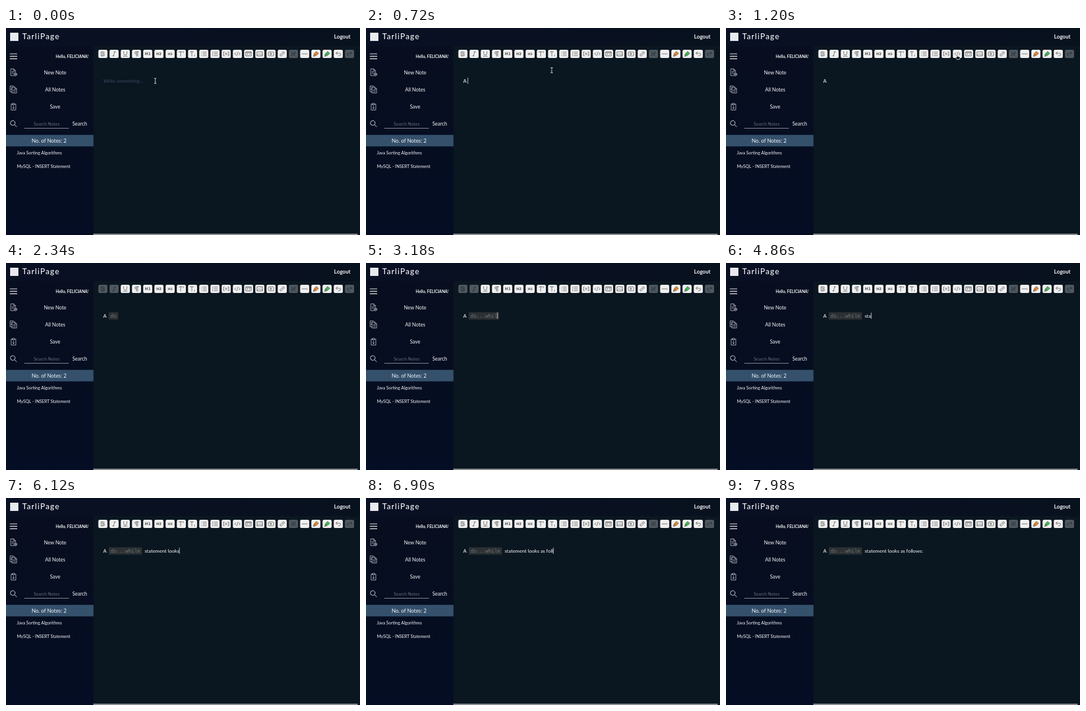
An HTML page that plays this animation: 600 px wide and 352 px high, repeating every 8 s.

```html
<!DOCTYPE html>
<html lang="en">
<head>
<meta charset="utf-8">
<title>Note editor</title>
<style>
  html, body { margin: 0; width: 100%; height: 100%; overflow: hidden; background: #0a1620; }
  svg { display: block; width: 600px; height: 352px; }
  text { font-family: Lato, "Open Sans", sans-serif; fill: #f6f7f9; white-space: pre; }
  .mid { text-anchor: middle; }
  .menu { font-size: 8.5px; }
  .note { font-size: 7.4px; }
  .body { font-size: 8.4px; fill: #fff; }
  .code { font-family: "Liberation Mono", monospace; font-size: 8.4px; fill: #74777a; }
  .line { fill: none; stroke: #d4d7dd; stroke-width: .75; stroke-linecap: round; stroke-linejoin: round; }
  .tool path { fill: none; stroke: #5c5c5c; stroke-width: .85; stroke-linecap: round; stroke-linejoin: round; }
  .tool text { font-family: "DejaVu Sans", sans-serif; fill: #555; text-anchor: middle; }
</style>
</head>
<body>
<svg viewBox="0 0 600 352">
  <defs>
    <linearGradient id="head"><stop stop-color="#0a1024"/><stop offset="1" stop-color="#08111e"/></linearGradient>
    <linearGradient id="side" x2="0" y2="1"><stop stop-color="#080e1f"/><stop offset="1" stop-color="#040d23"/></linearGradient>
  </defs>
  <rect width="600" height="352" fill="#0a1620"/>
  <rect y="31" width="148.300" height="321" fill="url(#side)"/>
  <rect width="600" height="31" fill="url(#head)"/>
  <rect x="148" y="349.700" width="448" height="2.300" fill="#8b8d8f"/>

  <rect x="7" y="8" width="14" height="14" fill="#e8eaed"/>
  <text x="27.500" y="19.400" font-size="13.400" font-weight="500" letter-spacing="1.200">TarliPage</text>
  <text x="570" y="18.200" class="mid" font-size="9" font-weight="700">Logout</text>
  <text x="140" y="51" text-anchor="end" font-size="6.800" font-weight="700">Hello, FELICIANA!</text>

  <g class="line">
    <path d="M7 44H18.500M7 48.200H18.500M7 52.400H18.500" stroke="#f3f4f6" stroke-width="1.200"/>
    <path d="M13.500 81H8V69.500H13L16 72.500V75M13 69.500V72.500H16M10 74.500H14M10 77H12.500"/>
    <circle cx="16" cy="78.800" r="2.500"/><path d="M16 77.500V80.100M14.700 78.800H17.300"/>
    <path d="M10 108.500H7V98.500H12.500L13.500 99.500M8.500 102H10M8.500 104.500H10M10.500 100.500H15L18 103.500V110.500H10.500ZM15 100.500V103.500H18M12.300 105.500H16M12.300 108H16"/>
    <path d="M11 129.500H8.700V139.500H16.700V129.500H14.500M11 128.200H14.500V130.500H11ZM12.750 132.500V137.200M11.200 135.700L12.750 137.200L14.300 135.700"/>
    <g stroke-width="1"><circle cx="11.500" cy="161.500" r="4"/><path d="M14.500 164.500L18 168"/></g>
    <path d="M31 170.500H106.500" stroke="#b4b8c0" stroke-linecap="butt"/>
  </g>
  <g class="menu mid">
    <text x="83.300" y="78.600">New Note</text>
    <text x="83.300" y="107.800">All Notes</text>
    <text x="83.300" y="137">Save</text>
    <text x="125" y="166.200">Search</text>
  </g>
  <text x="47" y="165.800" font-size="7.500" style="fill:#666c77">Search Notes</text>
  <rect y="181.700" width="148.300" height="19.600" fill="#34506b"/>
  <text x="73" y="195" class="mid" font-size="8.900">No. of Notes: 2</text>
  <g class="note">
    <text x="18.500" y="215.400">Java Sorting Algorithms</text>
    <text x="18.500" y="238">MySQL - INSERT Statement</text>
  </g>

  <g id="toolbar"></g>

  <text id="hint" class="body" x="165" y="93" style="fill:#3d4960">Write something...</text>
  <rect id="chip" x="174" y="83.700" height="12.600" rx="1" fill="#2b3033"/>
  <text id="lead" class="body" x="164.800" y="93"></text>
  <text id="code" class="code" x="177.200" y="92.600"></text>
  <text id="tail" class="body" x="232.800" y="93"></text>
  <text id="next" class="body" x="165" y="115"></text>
  <rect id="caret" width=".8" height="10.500" fill="#f3f4f6"/>

  <g id="beam" fill="none">
    <path d="M-2-4.500Q0-4.500 0-3V3Q0 4.500-2 4.500M2-4.500Q0-4.500 0-3V3Q0 4.500 2 4.500M-1 1H1" stroke="#c9ccd0" stroke-width="1.200"/>
    <path d="M0-3V3" stroke="#222" stroke-width=".5"/>
  </g>
  <path id="hand" d="M-1.500-3.500Q-.7-4.500 0-3.500V-.8L3.300 0Q4.200.4 4 1.500L3.200 4.500H-1L-3.500 1.200Q-3.500.2-2.500.4L-1.500 1Z"
        fill="#151515" stroke="#fff" stroke-width=".8"/>
</svg>
<script>
const $ = id => document.getElementById(id);
const LOOP = 8000, STEP = 60, BLINK = 300;

// Toolbar: each icon is drawn around the centre of its button
const heading = (s, size) => `<text y="${size * .36}" font-size="${size}" font-weight="700">${s}</text>`;
const stroke = (d, extra = '') => `<path d="${d}" ${extra}/>`;
const rows = 'M-1.500-3H4.500M-1.500 0H4.500M-1.500 3H4.500';
const chain = 'M-1 1L1.500-1.500M-.5-1.800L1-3.300Q2.300-4 3.300-3T3.200-.8L1.800.6M.5 1.800L-1 3.300Q-2.300 4-3.300 3T-3.200.8L-1.800-.6';
const frame = 'M-4.500-3.500H4.500V3.500H-4.500Z';
const marker = color => stroke('M-4 4L-2.800-.5L1-4.200L4.500-.8L.5 2.800Z', `style="fill:${color}"`) + stroke('M-4 4L0 0');
const arrow = 'M-1.500-3.500L-4-1.200L-1.500 1M-4-1.200H1.500Q4-1 4 1T1.500 3.200H0';
const icons = [
  stroke('M-2.500-3.500H.5Q2.500-3.300 2.300-1.700T.5 0Q3 .1 2.800 1.800T.5 3.500H-2.500ZM-1-2V-1.200H.4M-1 1.200V2H.7'),
  stroke('M0-3.500H2.500M-2.500 3.500H0M1.300-3.500L-1.300 3.500'),
  stroke('M-2.700-4V-.5Q-2.500 2 0 2T2.700-.5V-4M-3.300 4H3.300'),
  stroke('M3.500-3.700H-.5Q-3-3.500-3-1.700T-.5.2H0M0-3.700V4M2-3.700V4'),
  ...['H1', 'H2', 'H3'].map((h, i) => heading(h, 6.4 - i * .6)),
  stroke('M-4-3.500H1.500M-1.200-3.500V3.800M3.500-4V-2'),
  stroke('M-4-3.500H1.500M-1.200-3.500V3.800M3.300 2V4'),
  stroke(rows + 'M-4.200-3H-4M-4.200 0H-4M-4.200 3H-4'),
  stroke(rows + 'M-4-3.700V-2.300M-4-.7V.7M-4 2.300V3.700'),
  stroke('M-3-3.200H-4.500V3.200H-3M3-3.200H4.500V3.200H3M-1.700-1H1.700M-1.700 1H1.700'),
  stroke('M-2.500-2L-4.700 0L-2.500 2M2.500-2L4.700 0L2.500 2M.9-3L-.9 3'),
  stroke(frame + 'M-4.500-2H4.500M-1.300-.8L-2.700.6L-1.300 2M1.300-.8L2.700.6L1.300 2'),
  stroke(frame + 'M-4.500 2.500L-1.500-.3L.5 1.500L2 .2L4.500 2.500M2-1.700H2.200'),
  stroke('M-3.500-3.300H3.500Q4.500-3.300 4.500-2.300V2.300Q4.500 3.300 3.500 3.300H-3.500Q-4.500 3.300-4.500 2.300V-2.300Q-4.500-3.300-3.500-3.300M-1-1.500L1.700 0L-1 1.500Z'),
  stroke(chain),
  stroke(chain + 'M-4-4L4 4'),
  stroke('M-4.500 0H4.500'),
  marker('#f08a24'),
  marker('#35c04d'),
  stroke(arrow),
  stroke(arrow, 'transform="scale(-1 1)"'),
];
const DIM = .3, fixedDim = [17, 22];
$('toolbar').innerHTML = icons.map((icon, i) =>
  `<g class="tool" transform="translate(${164.2 + 19 * i} 44)" opacity="${fixedDim.includes(i) ? DIM : 1}">
    <rect x="-7.700" y="-7.100" width="15.400" height="14.200" rx="2.500" fill="#efefef"/>${icon}</g>`).join('');
const tools = [...$('toolbar').children];

// Typing: [segment, [time, characters]...]; an empty string only moves the caret
const typing = [
  ['lead', [60, 'A'], [120, ' ']],
  ['code', [1800, 'd'], [2040, 'o'], [2400, '.'], [2520, '.'], [2640, '.'],
    [2820, 'w'], [2940, 'h'], [3060, 'i'], [3180, 'l'], [3420, 'e']],
  ['tail', [4140, ''], [4440, ' '], [4620, 's'], [4740, 't'], [4860, 'a'], [4980, 't'], [5040, 'e'],
    [5220, 'm'], [5280, 'e'], [5400, 'nt'], [5460, ' '],
    [5640, 'l'], [5760, 'o'], [5880, 'o'], [6000, 'k'], [6120, 's'],
    [6360, ' '], [6480, 'a'], [6540, 's'], [6660, ' '], [6720, 'f'], [6840, 'o'],
    [6900, 'll'], [6960, 'o'], [7080, 'w'], [7200, 's'], [7380, ':']],
  ['next', [7680, '']],
];

const ramp = (t, from, to) => Math.min(1, Math.max(0, (t - from) / (to - from)));
const ease = p => p * p * (3 - 2 * p);
const show = (el, on) => el.setAttribute('visibility', on ? 'visible' : 'hidden');
const place = (el, x, y) => el.setAttribute('transform', `translate(${x} ${y})`);

function drawText(t) {
  let active = null, last = 0;
  for (const [id, ...keys] of typing) {
    const done = keys.filter(([at]) => at <= t);
    const el = $(id), text = done.map(([, chars]) => chars).join('');
    if (el.textContent !== text) el.textContent = text;
    if (done.length) { active = el; last = done[done.length - 1][0]; }
  }
  const width = el => el.textContent ? el.getComputedTextLength() : 0;
  show($('hint'), !active);
  show($('chip'), $('code').textContent);
  $('chip').setAttribute('width', width($('code')) + 6.4);
  show($('caret'), active && Math.floor((t - last) / BLINK) % 2 === 0);
  if (active) {
    $('caret').setAttribute('x', +active.getAttribute('x') + width(active));
    $('caret').setAttribute('y', active.getAttribute('y') - 8.5);
  }
}

function drawPointer(t) {
  const p = ease(ramp(t, 360, 1140));
  const x = 253 + 139.5 * p, y = 90 - 41 * p;
  const visible = t < 60 || (t >= 360 && t < 1800) || (t >= 3720 && t < 4440);
  const overTool = y < 52;
  place($('beam'), x, y);
  place($('hand'), x, y);
  show($('beam'), visible && !overTool);
  show($('hand'), visible && overTool);
}

function draw(now) {
  const t = Math.floor((now % LOOP) / STEP) * STEP;
  drawText(t);
  drawPointer(t);
  const dim = ramp(t, 1260, 1380) - ramp(t, 3960, 4200);
  for (const tool of tools.slice(0, 2)) tool.setAttribute('opacity', 1 - (1 - DIM) * dim);
}

const start = performance.now();
function tick() {
  draw(performance.now() - start);
  requestAnimationFrame(tick);
}
tick();
</script>
</body>
</html>
```
